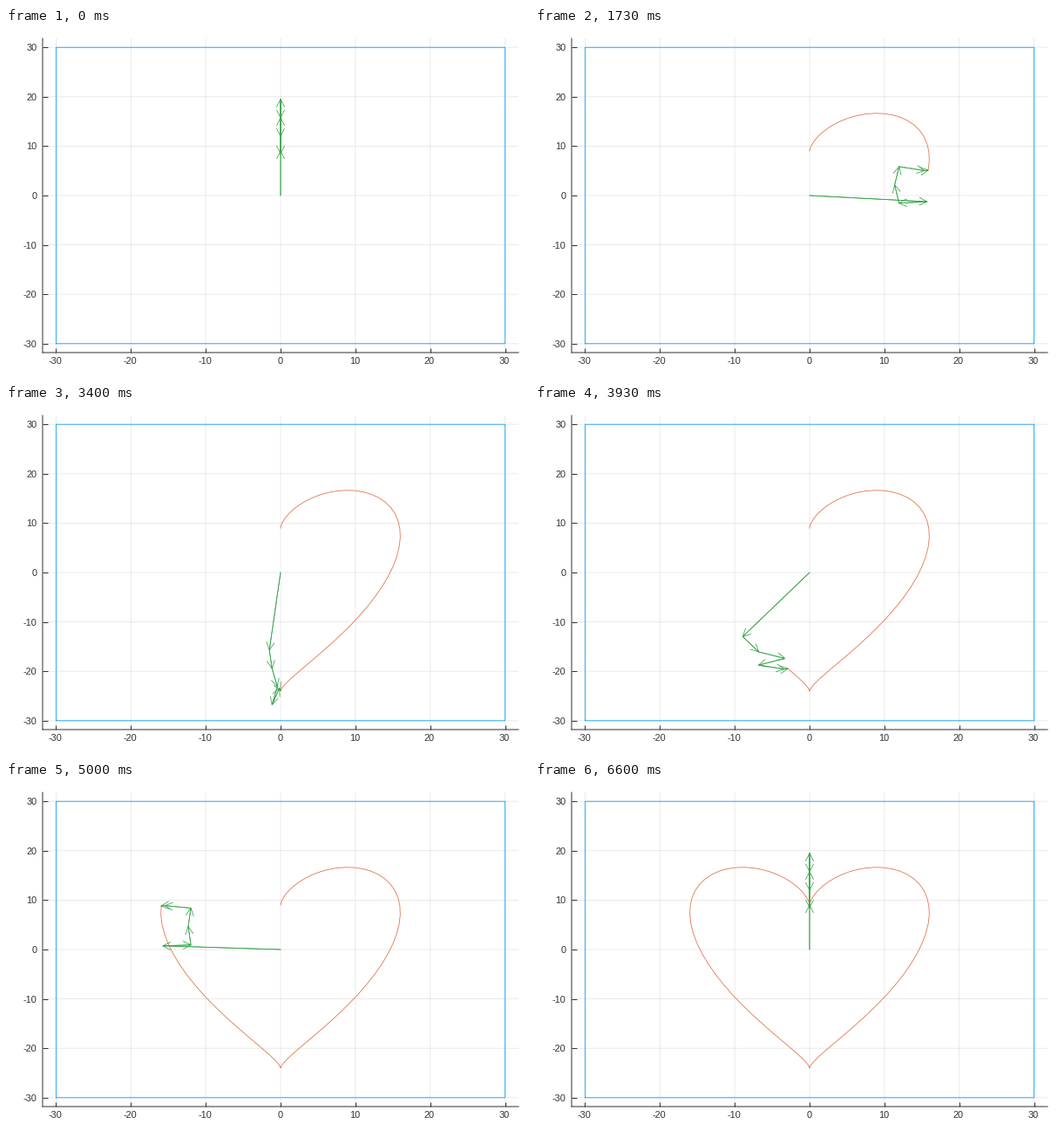
Animation of 600 by 400 pixels, one loop 6670 ms. Source, as a matplotlib script:

```python
import numpy as np
import matplotlib.pyplot as plt
from matplotlib.animation import FuncAnimation
from matplotlib.transforms import ScaledTranslation

W, H, DPI = 600, 400, 100
LOOP_MS, TICK_MS = 6670, 23  # short ticks keep the 15 fps steps on time
FPS, STEPS = 15, 100
PX = 72 / DPI  # points per pixel
THIN = 0.8 * PX
LIM = 31.8
AXES_PX = (42, 28, 546, 360)
SCALE = np.array(AXES_PX[2:]) / (2 * LIM)  # pixels per data unit

BLUE, ORANGE, GREEN, DARK = "#009afa", "#e26f46", "#3da44e", "#333333"

# (radius, frequency) of each rotating arrow; together they trace the heart
TERMS = [(15.75, 1), (3.75, -1), (-3.75, -2), (-3.75, 2), (-3.5, 3), (0.5, -3)]
HEAD = np.array([[-9, 4.6], [0, 0], [-9, -4.6]])

plt.rcParams["font.family"] = "Liberation Sans"
plt.rcParams["axes.unicode_minus"] = False
plt.rcParams["path.snap"] = False


def joints(t):
    """Joint positions of the arrow chain, for a scalar or an array of angles."""
    t = np.asarray(t, float)
    steps = [np.stack([r * np.sin(k * t), r * np.cos(k * t)], -1) for r, k in TERMS]
    return np.cumsum([np.zeros_like(steps[0])] + steps, axis=0)


def arrow(a, b):
    """Stem and open head from a to b; the head has a fixed pixel size."""
    dx, dy = (b - a) * SCALE
    rot = np.array([[dx, dy], [-dy, dx]]) / np.hypot(dx, dy)
    head = b + HEAD @ rot / SCALE
    return np.vstack([a, b, [np.nan, np.nan], head]).T


fig = plt.figure(figsize=(W / DPI, H / DPI), dpi=DPI, facecolor="white")
left, bottom, width, height = AXES_PX
ax = fig.add_axes([left / W, bottom / H, width / W, height / H])
ax.set(xlim=(-LIM, LIM), ylim=(-LIM, LIM))

ticks = range(-30, 31, 10)
ax.set_xticks(ticks, [str(v) for v in ticks], va="baseline")
ax.set_yticks(ticks, [str(v) for v in ticks], va="center_baseline")
ax.tick_params(direction="in", length=6 * PX, width=PX, color=DARK,
               labelcolor=DARK, labelsize=11 * PX)
ax.tick_params(axis="x", length=5 * PX, pad=13 * PX)
ax.tick_params(axis="y", pad=6.6 * PX)
nudge = ScaledTranslation(-0.8 / DPI, 0, fig.dpi_scale_trans)
for label in ax.get_xticklabels():
    label.set_transform(label.get_transform() + nudge)
ax.grid(color="black", alpha=0.1, lw=THIN)
ax.set_axisbelow(True)
for side, spine in ax.spines.items():
    spine.set_visible(side in ("left", "bottom"))
    spine.set(linewidth=PX, edgecolor=DARK)

R = 30
ax.plot([-R, R, R, -R, -R], [-R, -R, R, R, -R], color=BLUE, lw=THIN,
        solid_joinstyle="miter")

angles = np.linspace(0, 2 * np.pi, STEPS)
path = joints(angles)[-1]
trail, = ax.plot([], [], color=ORANGE, lw=THIN)
chain, = ax.plot([], [], color=GREEN, lw=THIN)
arrows = [ax.plot([], [], color=GREEN, lw=THIN, solid_capstyle="butt")[0]
          for _ in TERMS]


def draw(tick):
    # steps begin on whole hundredths of a second, hence the small lead
    ms = (tick + 1) * TICK_MS + 3.5
    i = min(int(ms * FPS / 1000), STEPS - 1)
    trail.set_data(*path[:i + 1].T)
    pts = joints(angles[i])
    chain.set_data(*pts.T)
    for line, a, b in zip(arrows, pts, pts[1:]):
        line.set_data(*arrow(a, b))
    return [trail, chain, *arrows]


anim = FuncAnimation(fig, draw, frames=LOOP_MS // TICK_MS, interval=TICK_MS,
                     repeat=True, repeat_delay=0, cache_frame_data=False)
plt.show()
```
